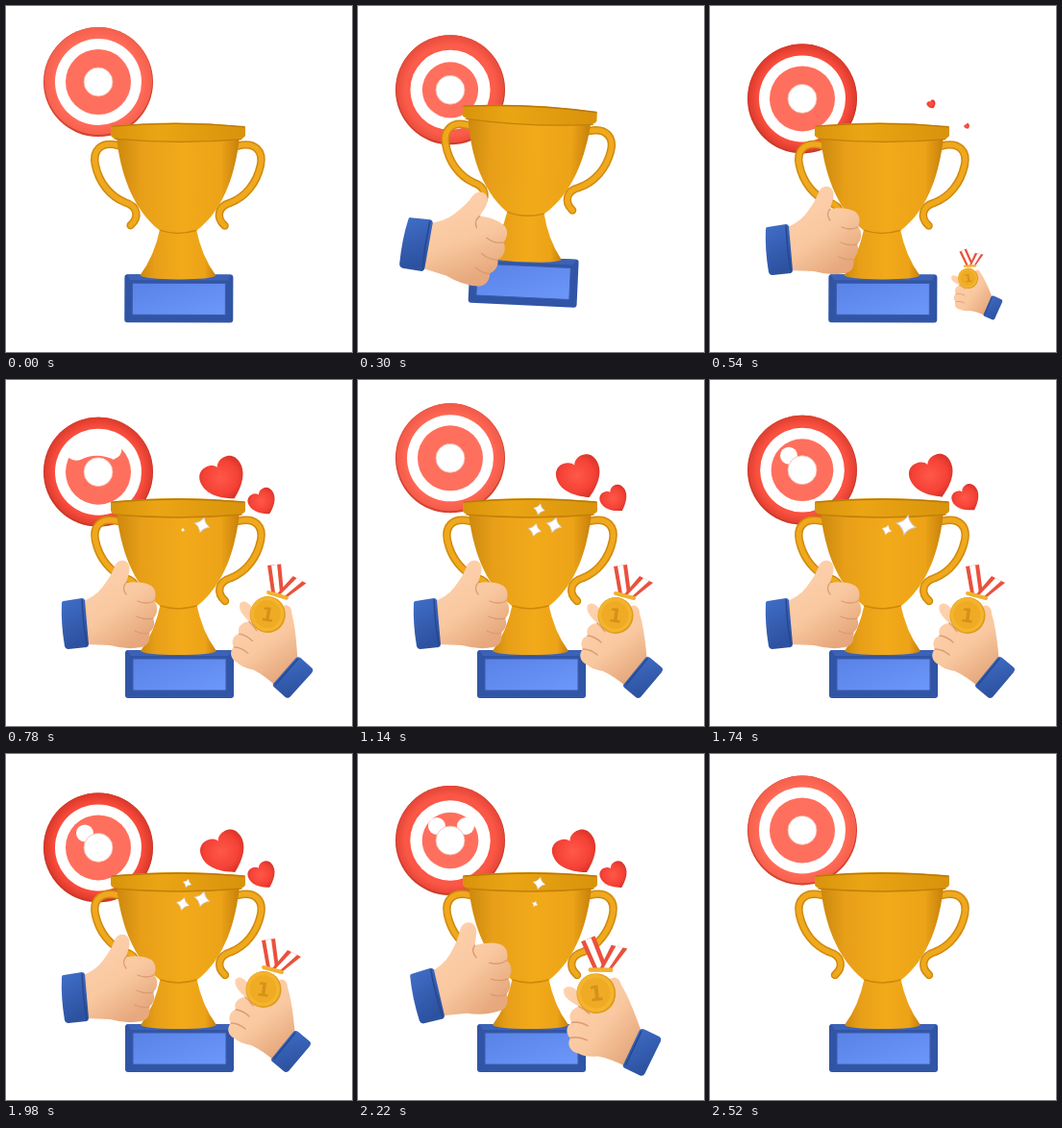
Animation, 360 px wide and 360 px high, one loop 2580 ms. Source, as an HTML page:

```html
<!DOCTYPE html>
<html lang="en">
<head>
<meta charset="utf-8">
<title>Trophy</title>
<style>
  html, body { margin: 0; width: 100%; height: 100%; overflow: hidden; background: #fff; }
  svg { display: block; width: 100%; height: 100%; }
  .line { fill: none; stroke-linecap: round; stroke-linejoin: round; }
</style>
</head>
<body>
<svg viewBox="0 0 360 360">
  <defs>
    <linearGradient id="gold">
      <stop offset="0" stop-color="#cc880e"/>
      <stop offset=".2" stop-color="#e89f18"/>
      <stop offset=".55" stop-color="#f2aa1a"/>
      <stop offset=".85" stop-color="#eca317"/>
      <stop offset="1" stop-color="#c6800b"/>
    </linearGradient>
    <linearGradient id="rim">
      <stop offset="0" stop-color="#d8930c"/>
      <stop offset=".35" stop-color="#eba514"/>
      <stop offset="1" stop-color="#d8930c"/>
    </linearGradient>
    <linearGradient id="panel" x2="1" y2="1">
      <stop offset="0" stop-color="#5a82e6"/>
      <stop offset="1" stop-color="#6c97fb"/>
    </linearGradient>
    <linearGradient id="skin" x2=".6" y2="1">
      <stop offset="0" stop-color="#ffd3b0"/>
      <stop offset=".6" stop-color="#f9c8a0"/>
      <stop offset="1" stop-color="#e6a87c"/>
    </linearGradient>
    <linearGradient id="cuff" x2=".3" y2="1">
      <stop offset="0" stop-color="#416fc9"/>
      <stop offset="1" stop-color="#2c519f"/>
    </linearGradient>
    <radialGradient id="love" cx=".45" cy=".4" r=".65">
      <stop offset="0" stop-color="#ff5849"/>
      <stop offset=".6" stop-color="#f54236"/>
      <stop offset="1" stop-color="#c92c24"/>
    </radialGradient>
    <radialGradient id="shade">
      <stop offset=".82" stop-color="#b8241a" stop-opacity="0"/>
      <stop offset="1" stop-color="#b8241a" stop-opacity=".5"/>
    </radialGradient>
    <path id="heartShape" fill="url(#love)" d="M0 22C-9 17-23 7-23-7C-23-17-17-21-11-21C-6-21-2-19 0-15C2-19 6-21 11-21C17-21 23-17 23-7C23 7 9 17 0 22Z"/>
    <path id="starShape" fill="#fff" stroke="#d3c6c4" stroke-width=".1" d="M0-1Q.28-.28 1 0Q.28.28 0 1Q-.28.28-1 0Q-.28-.28 0-1Z"/>
    <path id="handle" class="line" d="M117 147C98 142 90 153 93 167C97 186 109 200 124 206C138 210 139 222 130 230"/>
  </defs>

  <g id="target">
    <circle r="57" fill="#d94732"/>
    <circle id="outer" r="56" cy="-1"/>
    <circle id="edge" r="57" fill="url(#shade)"/>
    <circle id="ring" fill="#fff"/>
    <circle id="inner" fill="#ff6f5d"/>
    <path id="glare" fill="#fff" d="M-31-15Q-24-10-18-13Q-2-21 16-13Q26-17 24-26A35 35 0 0 0-31-15Z"/>
    <circle id="spotL" cx="-14" cy="-15" fill="#fff"/>
    <circle id="spotR" cx="16" cy="-15" fill="#fff"/>
    <circle r="15" fill="#fff" stroke="#f2b3a6" stroke-width=".8"/>
  </g>

  <use id="heartA" href="#heartShape"/>
  <use id="heartB" href="#heartShape"/>

  <g id="trophy">
    <g id="sides">
      <use href="#handle" stroke="#cf8a0e" stroke-width="8.4"/>
      <use href="#handle" stroke="#f0a81c" stroke-width="5.4"/>
    </g>
    <use href="#sides" transform="matrix(-1 0 0 1 358 0)"/>
    <rect x="124" y="281" width="113" height="50" rx="3" fill="#3155a6"/>
    <path d="M126 281H235L231 287H130Z" fill="#3c62b6"/>
    <rect x="132" y="290" width="97" height="33" fill="url(#panel)" stroke="#3a5ca6"/>
    <path d="M161 232H198Q204 262 219 282Q214 286 179.500 286Q145 286 140 282Q155 262 161 232Z" fill="url(#gold)"/>
    <path d="M115 138H243C239 174 228 212 199 235Q179 241 160 235C131 212 119 174 115 138Z" fill="url(#gold)"/>
    <path class="line" d="M161 235Q179 241 198 235" stroke="#cd880c" stroke-width="1.500"/>
    <path d="M109 127Q179 119 249 127V136Q248 139 243 140Q179 146 115 140Q110 139 109 136Z" fill="url(#rim)"/>
    <path class="line" d="M110 127Q179 121 248 127" stroke="#b97806" stroke-width="1.400"/>
    <path class="line" d="M113 140Q179 146 245 140" stroke="#c38009" stroke-width="1.300"/>
  </g>

  <use id="starA" href="#starShape"/>
  <use id="starB" href="#starShape"/>
  <use id="starC" href="#starShape"/>

  <g id="left">
    <path fill="url(#skin)" d="M78 231Q92 226 100 216C106 208 110 202 113 194C116 186 126 186 128 193C130 199 126 206 125 211Q140 209 149 213C156 216 157 224 154 230C159 235 158 244 153 248C156 254 153 260 149 263C151 269 148 277 141 278Q126 281 108 276L82 275Z"/>
    <path class="line" stroke="#d99c72" stroke-width="1.300" d="M125 211Q120 216 125 223M154 230Q146 234 137 230M153 248Q144 250 136 246M149 263Q142 265 134 261"/>
    <path d="M60 230L79 227Q81 227 82 229L86 275Q86 277 84 278L65 280Q62 280 61 277Q57 253 58 232Q58 230 60 230Z" fill="url(#cuff)"/>
    <path class="line" d="M79 229Q80 253 84 276" stroke="#27488f" stroke-width="1.500"/>
  </g>

  <g id="right">
    <path fill="url(#skin)" d="M239 234C244 230 249 234 253 241L283 236C288 232 293 236 293 243C297 256 299 272 301 293L279 319Q266 308 255 303Q243 301 238 296C231 293 229 285 234 280C230 274 234 267 239 266C236 259 242 253 249 253C244 248 236 241 239 234Z"/>
    <path class="line" stroke="#d99c72" stroke-width="1.300" d="M239 266Q247 267 253 273M234 280Q242 280 249 286M249 253Q253 256 257 262"/>
    <path d="M299 289Q301 287 304 289L316 299Q318 301 316 304L294 330Q291 332 289 330L277 320Q275 318 277 316Z" fill="url(#cuff)"/>
    <path class="line" d="M301 290L279 317" stroke="#27488f" stroke-width="1.500"/>
    <path d="M266 194L280 192L284 223L271 222Z" fill="#e9513d"/>
    <path d="M270 193.500L276 192.700L280 222.800L275 222.500Z" fill="#fff"/>
    <path d="M293 204L307 211L288 226L277 223Z" fill="#e9513d"/>
    <path d="M297 206L303 209L285 225.200L280 224Z" fill="#fff"/>
    <path class="line" d="M268 222L287 227" stroke="#f3b030" stroke-width="4"/>
    <ellipse cx="268" cy="245" rx="18.500" ry="19" fill="#dc9a1a"/>
    <ellipse cx="267.500" cy="244.500" rx="17.500" ry="18" fill="#f5b42e"/>
    <ellipse cx="267.500" cy="244.500" rx="14" ry="14.500" fill="#f0ab25"/>
    <text x="268" y="252" text-anchor="middle" font-family="'DejaVu Sans', sans-serif" font-weight="700" font-size="20" fill="#d5921a" transform="rotate(8 268 245)">1</text>
  </g>
</svg>

<script>
const LOOP = 2580, STEP = 30, BOB = LOOP / 2;
const el = id => document.getElementById(id);

// Smooth rise from 0 to 1 between two times.
function ramp(t, from, to) {
  const u = Math.min(1, Math.max(0, (t - from) / (to - from)));
  return u * u * (3 - 2 * u);
}

// Rises over a span after the start and falls over the same span before the end.
const show = (t, start, end, span) => ramp(t, start, start + span) - ramp(t, end - span, end);

function place(id, x, y, rot, scale, px = 0, py = 0) {
  const node = el(id);
  node.style.display = scale > .01 ? '' : 'none';
  node.setAttribute('transform',
    `translate(${x} ${y}) rotate(${rot}) scale(${scale}) translate(${-px} ${-py})`);
}

function drawTarget(t, angle) {
  const low = (1 - Math.cos(angle)) / 2;
  const turn = Math.min(0, Math.cos(2 * angle));
  place('target', 96, 79 + 18.6 * low, 0, 1);
  el('outer').setAttribute('fill', `hsl(${7 - 2 * low} ${100 - 7 * low}% ${67 - 7 * low}%)`);
  el('edge').setAttribute('opacity', .3 + .7 * low);
  el('ring').setAttribute('r', 45 + 3.5 * turn);
  el('inner').setAttribute('r', 34 + 5 * turn);
  el('glare').setAttribute('opacity', show(t, 630, 960, 120));
  el('spotL').setAttribute('r', 9 * show(t, 1590, 2370, 150));
  el('spotR').setAttribute('r', 9 * show(t, 1980, 2370, 150));
}

function drawTrophy(t) {
  const u = (t + 60) % LOOP / 660;
  const jump = u < 1 ? Math.sin(Math.PI * u) ** 2 : 0;
  place('trophy', 180, 125 - 20 * jump, 2.7 * jump, 1, 180, 125);
}

function drawHearts(t, angle) {
  const pop = show(t, 480, 2460, 210);
  const sway = Math.cos(angle - .84);
  place('heartA', 231.5 + 4.5 * sway, 102 - 2 * sway, -25 + 4 * sway, pop);
  place('heartB', 267.5, 124.5 - 3 * sway, -33 - 4 * sway, .62 * pop);
}

function drawStar(id, x, y, size, start, period, t) {
  const pulse = t < start ? 0 : Math.abs(Math.sin(Math.PI * (t - start) / period));
  place(id, x, y, 12 + 20 * (1 - pulse), size * pulse * show(t, 570, 2430, 120));
}

function drawHands(t) {
  const lift = ramp(t, 2070, 2220), leave = ramp(t, 2220, 2460);

  const away = 1 - ramp(t, 90, 300), lean = 1 - ramp(t, 300, 480);
  place('left',
    72 - 11 * lean + 20 * away + 37 * leave,
    253 - 6 * lean - 2 * lift + 12 * (away + leave),
    15 * lean + 30 * away - 8 * lift - 26 * leave,
    (1 - away) * (1 - leave) * (1 + .06 * (lean + lift)), 72, 253);

  const off = 1 - ramp(t, 360, 690), drift = ramp(t, 780, 1140);
  place('right',
    298 - 2 * drift - lift - 9 * (off + leave),
    310 + lift + 10 * (off + leave),
    2 - 2 * drift - 14 * lift - 29 * leave - 42 * off,
    (1 - off) * (1 - leave) * (1 + .1 * lift), 296, 310);
}

function draw(t) {
  const angle = 2 * Math.PI * t / BOB;
  drawTarget(t, angle);
  drawHearts(t, angle);
  drawTrophy(t);
  drawStar('starA', 204, 151, 10.5, 540, 840, t);
  drawStar('starB', 184, 156, 7, 700, 820, t);
  drawStar('starC', 188.5, 134.5, 6.5, 780, 960, t);
  drawHands(t);
}

const begin = performance.now();
function tick() {
  const t = (performance.now() - begin) % LOOP;
  draw(Math.floor(t / STEP) * STEP);
  requestAnimationFrame(tick);
}
tick();
</script>
</body>
</html>
```
